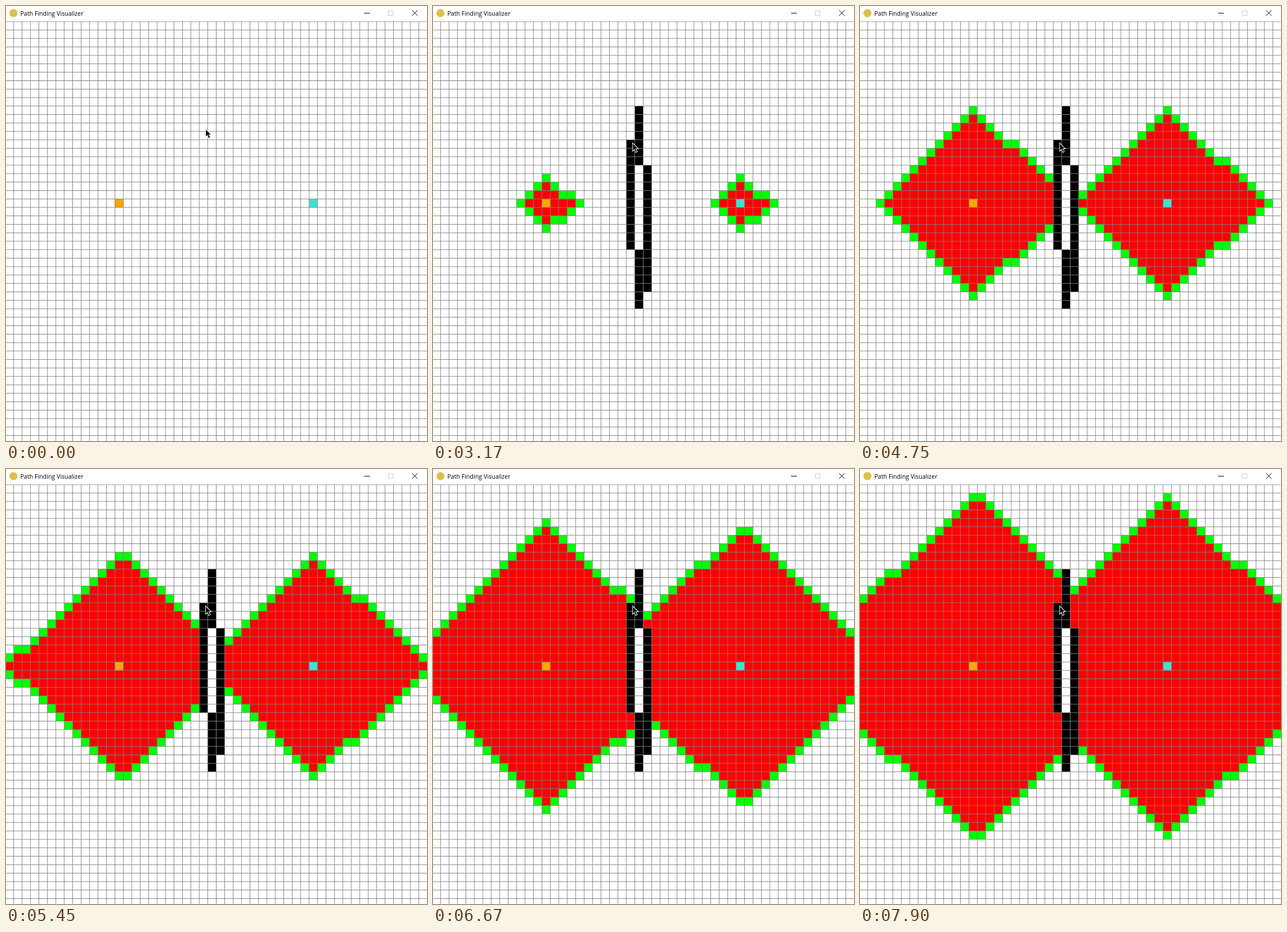
These frames come from a looping animation (736x760 px, 8000 ms). An HTML page with a canvas:

```html
<!DOCTYPE html>
<html lang="en">
<head>
<meta charset="utf-8">
<title>Path Finding Visualizer</title>
<style>
  html, body { margin: 0; width: 100%; height: 100%; overflow: hidden; background: #fff; }
  canvas { display: block; }
</style>
</head>
<body>
<canvas id="stage" width="736" height="760"></canvas>
<script>
const LOOP = 8000, SIZE = 50, CELL = 16, BOARD = SIZE * CELL, SCALE = 0.9225;
const START = [13, 21], END = [36, 21];
const SEARCH_START = 3170, FIRST_CELLS = 14.66, CELLS_PER_MS = 0.1362;

const ctx = document.getElementById('stage').getContext('2d');

// The board is drawn at full size and shrunk, which softens its lines
const boardCanvas = document.createElement('canvas');
boardCanvas.width = boardCanvas.height = BOARD;
const board = boardCanvas.getContext('2d');

// Cells of a column from one row to another, in drawing order
const column = (col, from, to) => Array.from(
  { length: Math.abs(to - from) + 1 },
  (_, i) => [col, from + Math.sign(to - from) * i]);

const walls = [
  ...column(24, 10, 16), ...column(25, 17, 31), ...column(24, 31, 33),
  ...column(24, 30, 27), ...column(23, 26, 14)
];

// Mouse moves; "drawn" is the number of wall cells present at the end
const rest = { x: 349.5, y: 216, drawn: 0 };
const moves = [
  { start: 120, end: 240, steps: 2, x: 367.5, y: 181, drawn: 0 },
  { start: 520, end: 1420, steps: 8, x: 360.7, y: 518.3, drawn: 25 },
  { start: 1570, end: 2080, steps: 5, x: 349.5, y: 240.5, drawn: walls.length }
];

const mix = (a, b, e) => a + (b - a) * e;
const smooth = p => p * p * (3 - 2 * p);

function mouseAt(t) {
  let now = rest;
  for (const move of moves) {
    if (t < move.start) break;
    const step = Math.floor((t - move.start) / (move.end - move.start) * (move.steps - 1)) + 1;
    const e = smooth(Math.min(1, step / move.steps));
    now = {
      x: mix(now.x, move.x, e),
      y: mix(now.y, move.y, e),
      drawn: Math.round(mix(now.drawn, move.drawn, e))
    };
  }
  return now;
}

function fillCell([col, row], color) {
  board.fillStyle = color;
  board.fillRect(col * CELL, row * CELL, CELL, CELL);
}

// Breadth-first search, stopped after a number of expansions
function drawSearch(origin, limit) {
  const key = (col, row) => row * SIZE + col;
  const seen = new Set([...walls, origin].map(cell => key(...cell)));
  const queue = [origin];
  for (let i = 0; i < limit && i < queue.length; i++) {
    const [col, row] = queue[i];
    for (const [dx, dy] of [[1, 0], [-1, 0], [0, 1], [0, -1]]) {
      const c = col + dx, r = row + dy;
      if (c < 0 || r < 0 || c >= SIZE || r >= SIZE || seen.has(key(c, r))) continue;
      seen.add(key(c, r));
      queue.push([c, r]);
    }
  }
  queue.forEach((cell, i) => fillCell(cell, i < limit ? '#f00' : '#0f0'));
}

function drawBoard(t, drawn) {
  board.fillStyle = '#fff';
  board.fillRect(0, 0, BOARD, BOARD);
  if (t >= SEARCH_START) {
    const limit = Math.round(FIRST_CELLS + CELLS_PER_MS * (t - SEARCH_START));
    [START, END].forEach(cell => drawSearch(cell, limit));
  }
  walls.slice(0, drawn).forEach(cell => fillCell(cell, '#000'));
  fillCell(START, '#ffa500');
  fillCell(END, '#40e0d0');
  board.fillStyle = '#808080';
  for (let p = 0; p < BOARD; p += CELL) {
    board.fillRect(p, 0, 1, BOARD);
    board.fillRect(0, p, BOARD, 1);
  }
  ctx.drawImage(boardCanvas, -2, 26.7, BOARD * SCALE, BOARD * SCALE);
}

function drawTitleBar() {
  ctx.fillStyle = '#dcc04a';
  ctx.beginPath();
  ctx.arc(13, 12.5, 7, 0, 7);
  ctx.fill();
  ctx.fillStyle = '#000';
  ctx.font = '10.5px "Open Sans", "Noto Sans", sans-serif';
  ctx.fillText('Path Finding Visualizer', 25, 17);
  ctx.fillRect(626, 12, 10, 1);
  ctx.lineWidth = 1;
  ctx.strokeStyle = '#ccc';
  ctx.strokeRect(668.5, 8.5, 8, 8);
  ctx.strokeStyle = '#000';
  ctx.stroke(new Path2D('M710 7.5l9.5 9.5m0-9.5l-9.5 9.5'));
}

const arrow = new Path2D('M0 0V12L2.8 9.2L5 14.7L6.9 13.8L4.6 8.5H8.3Z');

function drawMouse({ x, y }) {
  ctx.save();
  ctx.translate(x, y);
  ctx.strokeStyle = '#fff';
  ctx.lineWidth = 2;
  ctx.stroke(arrow);
  ctx.fillStyle = '#000';
  ctx.fill(arrow);
  ctx.restore();
}

function draw(t) {
  const mouse = mouseAt(t);
  ctx.fillStyle = '#fff';
  ctx.fillRect(0, 0, 736, 760);
  drawBoard(t, mouse.drawn);
  drawTitleBar();
  drawMouse(mouse);
}

const began = performance.now();
function frame() {
  draw((performance.now() - began) % LOOP);
  requestAnimationFrame(frame);
}
frame();
</script>
</body>
</html>
```
